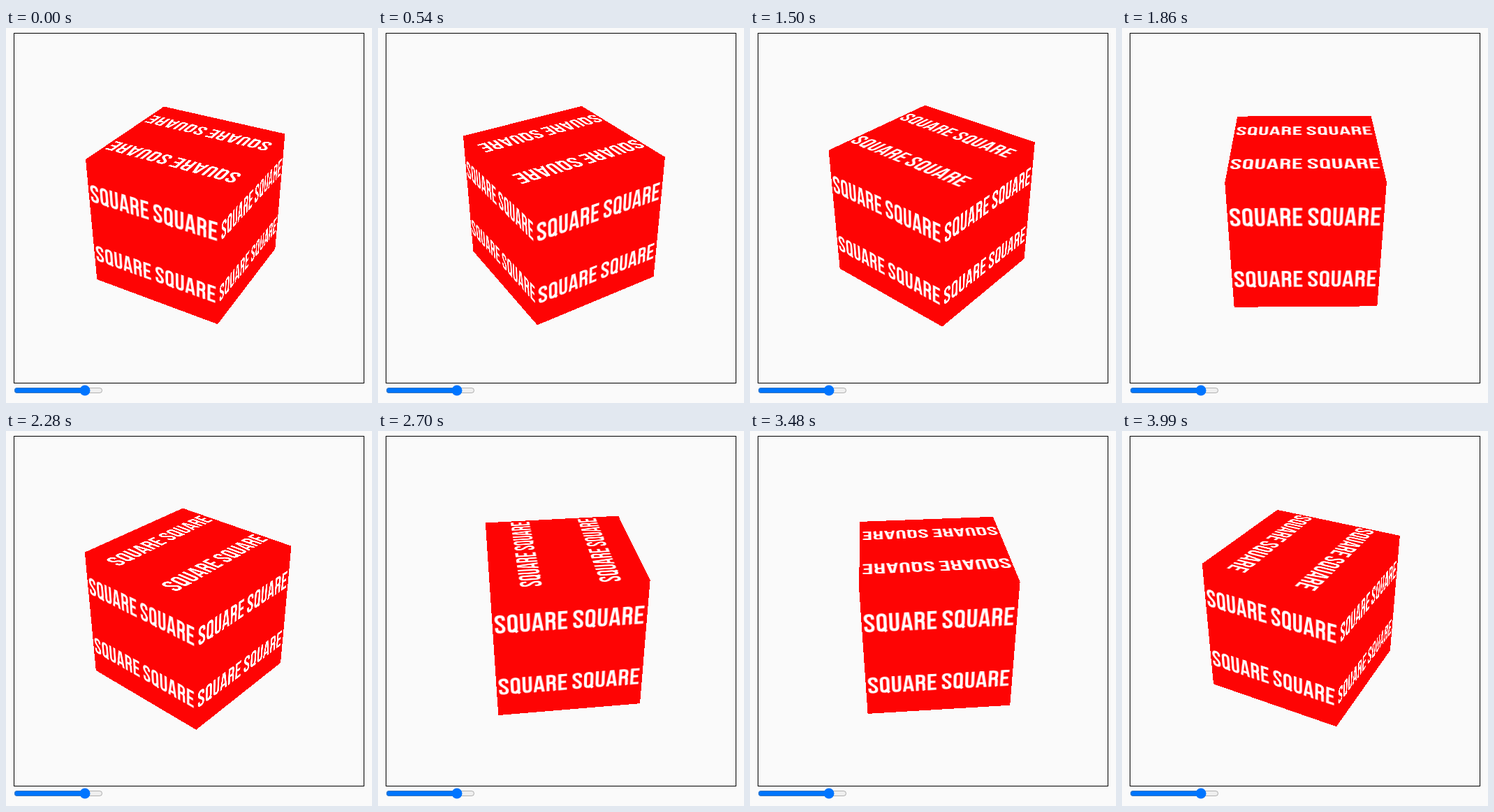
An HTML page that plays this animation: 524 by 537 pixels, repeating every 4020 ms.

```html
<!DOCTYPE html>
<html lang="en">
<head>
<meta charset="utf-8">
<title>Turning cube</title>
<style>
  html, body { margin: 0; width: 100%; height: 100%; overflow: hidden; background: #fafafa; }
  #view { position: absolute; left: 11px; top: 7px; width: 500px; height: 500px; border: 1px solid #000; }
  #solid { position: absolute; left: 0; top: 0; fill: #fe0404; shape-rendering: crispEdges; }
  .face { position: absolute; left: 150px; top: 150px; width: 200px; height: 200px; backface-visibility: hidden; }
  .face svg { display: block; }
  input { position: absolute; left: 10.5px; top: 511px; margin: 0; width: 128px; height: 16px; pointer-events: none; }
</style>
</head>
<body>
<svg width="0" height="0" style="position:absolute">
  <defs>
    <!-- condensed capitals, 700 units high -->
    <g id="word" fill="none" stroke="#fff" stroke-width="100">
      <path d="M305 220V175Q305 55 191 55T77 175Q77 260 191 350T305 525Q305 645 191 645T77 525V475"/>
      <path transform="translate(384)" d="M93 175Q93 55 202 55T311 175V525Q311 645 202 645T93 525ZM225 555L350 690"/>
      <path transform="translate(786)" d="M93 5V530Q93 645 198 645T303 530V5"/>
      <path transform="translate(1182)" fill="#fff" fill-rule="evenodd" stroke="none"
        d="M15 695L130 5H278L393 695H292L273 573H130L111 695ZM144 478H256L200 130Z"/>
      <path transform="translate(1592)" d="M96 695V55H200Q315 55 315 165V225Q315 350 200 350H96M200 350Q315 350 315 460V600Q315 660 328 695"/>
      <path transform="translate(1996)" d="M341 55H96V645H341M96 345H310"/>
    </g>
  </defs>
</svg>
<div id="view"><svg id="solid" width="500" height="500"></svg></div>
<input type="range" min="0" max="100" step="any" value="84.4" tabindex="-1" aria-label="Speed">
<script>
const view = document.getElementById('view');
const solid = document.getElementById('solid');
const LOOP = 4020, STEP = 30;

// turn in degrees at a given step
const turns = [[0, -209.1], [18, -148.1], [37, -83.9], [62, .6], [90, 97.2], [116, 185.2], [133, 242.5]];

// camera at (0, 5, 8) with a 30 degree field of view; one unit is 100px
const focal = 250 / Math.tan(Math.PI / 12);
const pitch = Math.atan2(5, 8);
const camera = `perspective(${focal}px) translateZ(${focal - 100 * Math.hypot(5, 8)}px) rotateX(${-pitch}rad)`;

const words = [0, 200].flatMap(y => [0, 200].map(x =>
  `<use href="#word" transform="translate(${x + 4} ${y + 73.5}) scale(.08)"/>`)).join('');

const faces = ['rotateY(0deg)', 'rotateY(90deg)', 'rotateY(180deg)', 'rotateY(270deg)', 'rotateX(90deg)'].map(side => {
  const el = document.createElement('div');
  el.className = 'face';
  el.innerHTML = `<svg viewBox="0 0 400 400" width="200" height="200" role="img" aria-label="SQUARE SQUARE">${words}</svg>`;
  view.append(el);
  return { el, side };
});

function turnAt(step) {
  const i = turns.findIndex(([s]) => s > step);
  if (i < 0) return turns.at(-1)[1];
  const [s0, a0] = turns[i - 1], [s1, a1] = turns[i];
  return a0 + (a1 - a0) * (step - s0) / (s1 - s0);
}

// screen place of the cube corner at a given angle, y is 1 for the top
function corner(angle, y) {
  const a = angle * Math.PI / 180, c = Math.cos(pitch), s = Math.sin(pitch);
  const x = Math.SQRT2 * Math.sin(a), z = Math.SQRT2 * Math.cos(a);
  const scale = focal / (Math.hypot(5, 8) - z * c - y * s);
  return [250 + x * scale, 250 - (y * c - z * s) * scale];
}

const polygon = points => `<polygon points="${points.join(' ')}"/>`;

function draw(now) {
  const turn = turnAt(Math.floor(now % LOOP / STEP));
  const angles = [45, 135, 225, 315].map(a => a + turn);
  solid.innerHTML = polygon(angles.map(a => corner(a, 1))) + angles.map(a =>
    polygon([corner(a, 1), corner(a + 90, 1), corner(a + 90, -1), corner(a, -1)])).join('');
  for (const { el, side } of faces)
    el.style.transform = `${camera} rotateY(${turn}deg) ${side} translateZ(100px)`;
  requestAnimationFrame(draw);
}
draw(performance.now());
</script>
</body>
</html>
```
